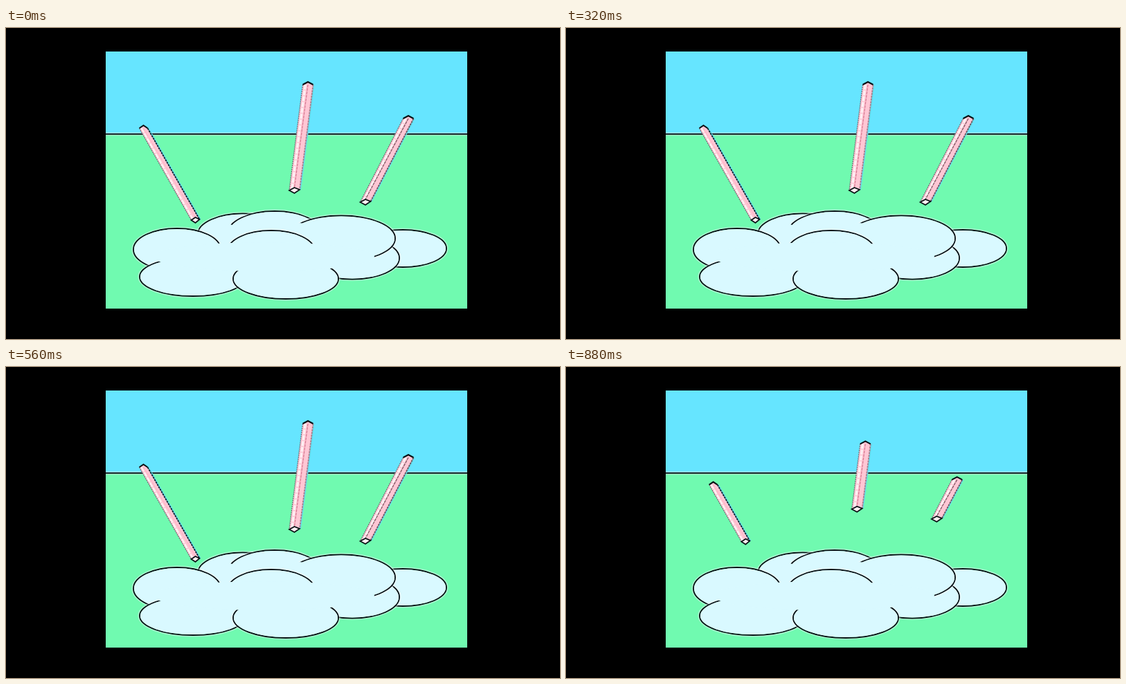
These frames come from a looping animation (800 px wide and 450 px high, 0.96 s). An HTML page with a canvas:

```html
<!DOCTYPE html>
<html lang="en">
<head>
<meta charset="utf-8">
<style>
  html, body { margin: 0; width: 100%; height: 100%; overflow: hidden; background: #000; }
  canvas { display: block; }
</style>
</head>
<body>
<canvas id="stage" width="800" height="450"></canvas>
<script>
const ctx = document.getElementById('stage').getContext('2d');
const LOOP = 960, SHRINK_AT = 640;
const INK = '#071014', HALO = 'rgba(255, 255, 255, 0.4)';

function line(points, color, width, { fill, dash = [] } = {}) {
  ctx.beginPath();
  points.forEach(p => ctx.lineTo(...p));
  if (fill) {
    ctx.closePath();
    ctx.fillStyle = fill;
    ctx.fill();
  }
  ctx.strokeStyle = color;
  ctx.lineWidth = width;
  ctx.setLineDash(dash);
  ctx.stroke();
  ctx.setLineDash([]);
}

function puff(x, y, rx, ry, outlined = true) {
  ctx.beginPath();
  ctx.ellipse(x, y, rx, ry, 0, 0, 2 * Math.PI);
  if (outlined) {
    for (const [color, width] of [[HALO, 5], [INK, 1.9]]) {
      ctx.strokeStyle = color;
      ctx.lineWidth = width;
      ctx.stroke();
    }
    // The fill leaves the outline visible
    ctx.beginPath();
    ctx.ellipse(x, y, rx - 0.9, ry - 0.9, 0, 0, 2 * Math.PI);
  }
  ctx.fillStyle = '#d9f9ff';
  ctx.fill();
}

// Painted back to front; plain puffs hide the seams inside the cloud
function drawCloud() {
  puff(573, 319, 63, 27);
  puff(500, 333, 68, 30.5);
  puff(342, 298.5, 65, 30);
  puff(388, 298, 68, 33);
  puff(247, 320.5, 63, 30.5);
  puff(484, 304.5, 78, 33);
  puff(423, 298, 17, 16, false);
  puff(322, 298, 12, 14, false);
  puff(270, 360, 77, 28);
  puff(383, 323, 63, 30);
  puff(404, 363, 76, 29);
  puff(372, 331, 160, 21, false);
}

// Each stick is a square prism along its axis; both ends pull in when short
function drawStick({ top, bottom, w, shrink, edge, ridge }, short) {
  const dx = bottom[0] - top[0], dy = bottom[1] - top[1];
  const pull = short ? shrink / Math.hypot(dx, dy) : 0;
  const at = ([x, y], sign) => (ox, oy) => [x + sign * dx * pull + ox, y + sign * dy * pull + oy];
  const head = at(top, 1), foot = at(bottom, -1);
  const cap = [head(-w, 1), head(0, -3), head(w, 1)];
  const base = [foot(-w, 0), foot(0, 4), foot(w, -1), foot(0, -4)];

  line([head(w + 1, 1), foot(w + 1, -1)], '#5fe0f0', 2);
  line([...cap, base[2], base[1], base[0]], 'transparent', 1, { fill: '#ffc6d4' });
  line([head(-w / 2, 1), foot(-w / 2, 0)], '#fff0f3', w * 0.4, { dash: [7, 1.5] });
  line([head(0, 1), base[3]], ridge, 1.3, { dash: [4, 1] });
  line([cap[0], base[0]], '#6d6a72', 1.2, { dash: [2, 1] });
  line([cap[2], base[2]], edge, 1.8, { dash: [3, 1] });
  line(cap, INK, 2);
  line(base, INK, 1.7, { fill: '#fff0f2' });
}

const sticks = [
  { top: [198.5, 144], bottom: [273.5, 278], w: 6, shrink: 29, edge: '#0b252e', ridge: '#ffb3c6' },
  { top: [436, 81], bottom: [416.5, 235], w: 7.5, shrink: 29.5, edge: '#a87f8e', ridge: '#d77c93' },
  { top: [581, 130], bottom: [519, 252], w: 7.5, shrink: 36, edge: '#6d5860', ridge: '#7d5863' }
];

function draw() {
  ctx.fillStyle = '#000';
  ctx.fillRect(0, 0, 800, 450);
  ctx.fillStyle = '#66e5ff';
  ctx.fillRect(144, 34, 522, 120);
  ctx.fillStyle = '#70fab0';
  ctx.fillRect(144, 154, 522, 252);
  const horizon = [[144, 153.5], [666, 153.5]];
  line(horizon, HALO, 5);
  line(horizon, INK, 1.8);
  drawCloud();
  const short = performance.now() % LOOP >= SHRINK_AT;
  sticks.forEach(stick => drawStick(stick, short));
  requestAnimationFrame(draw);
}
draw();
</script>
</body>
</html>
```
